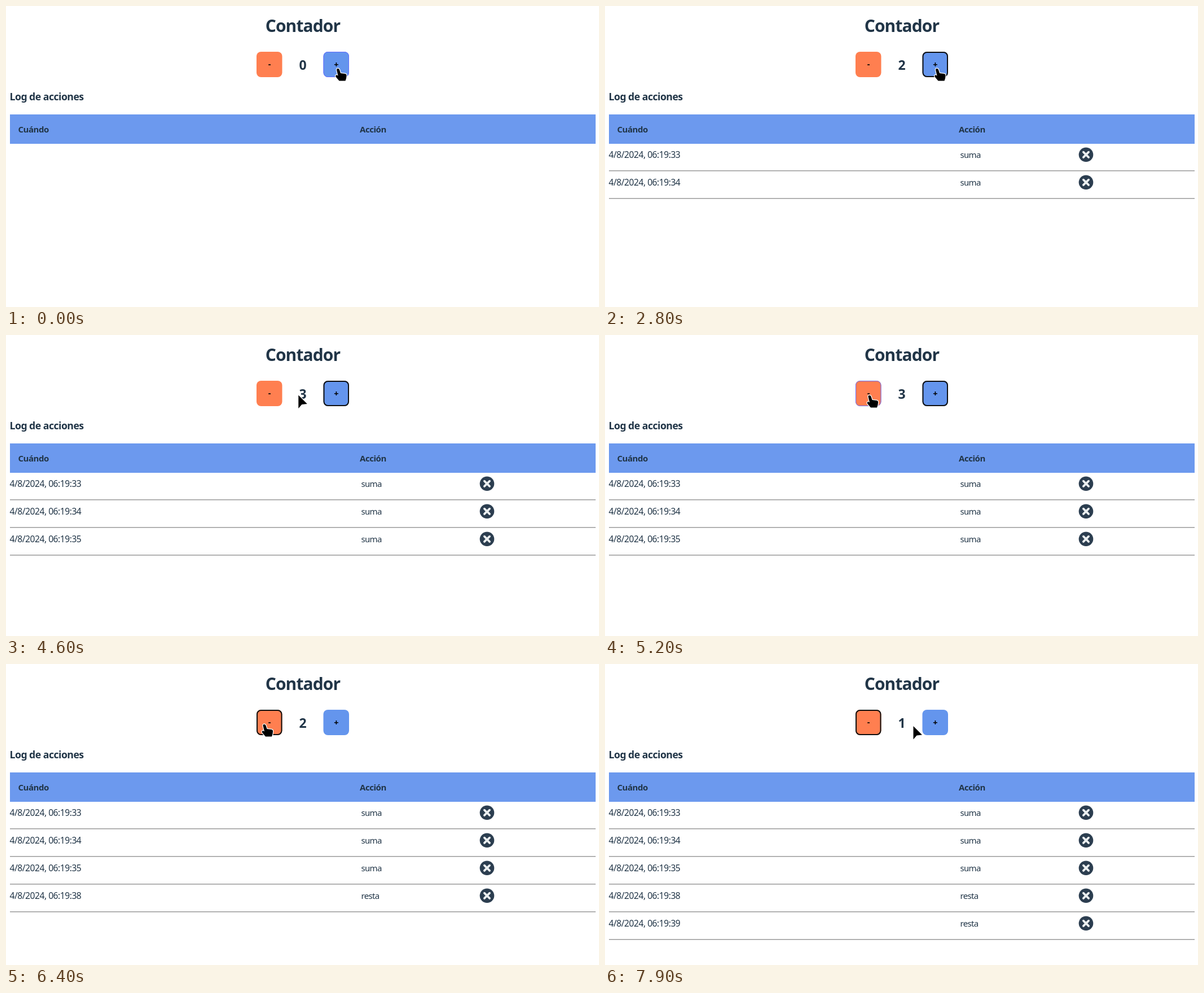
Recreate the animation shown at these times as an HTML page. Size 1051 by 533 pixels, loop 8000 ms.

```html
<!DOCTYPE html>
<html lang="es">
<head>
<meta charset="utf-8">
<title>Contador</title>
<style>
  html, body { margin: 0; width: 100%; height: 100%; overflow: hidden; background: #fff; }
  svg { display: block; }
  text { font: 15.6px "Noto Sans", "Open Sans", sans-serif; fill: #213547; letter-spacing: -.03em; }
  .bold { font-weight: 700; }
  .mid { text-anchor: middle; }
  .title { font-size: 30px; }
  .subtitle { font-size: 17.7px; }
  .head { font-size: 15px; }
  .action { font-size: 15px; letter-spacing: -.045em; }
  .count { font-size: 23px; letter-spacing: 0; }
  .sign { font-size: 14.5px; fill: #000; letter-spacing: 0; }
  .edge { fill: none; }
  .cursor path { stroke: #fff; stroke-width: 2.4; stroke-linejoin: round; paint-order: stroke; }
</style>
</head>
<body>
<svg width="1051" height="533" viewBox="0 0 1051 533">
  <defs>
    <g id="close">
      <circle r="12.8" fill="#2c3e50"/>
      <path d="M-4.6-4.6 4.6 4.6M4.6-4.6-4.6 4.6" stroke="#ecf0f1" stroke-width="3.8" stroke-linecap="round"/>
    </g>
  </defs>
  <text class="bold mid title" x="526" y="45.5">Contador</text>
  <rect x="444" y="81" width="45.5" height="45" rx="8" fill="#ff7f50"/>
  <rect x="562.5" y="81" width="45.5" height="45" rx="8" fill="#6495ed"/>
  <rect class="edge" id="minusEdge"/>
  <rect class="edge" id="plusEdge"/>
  <text class="bold mid sign" x="467" y="108">-</text>
  <text class="bold mid sign" x="585.3" y="109.3">+</text>
  <text class="bold mid count" id="count" x="526" y="113"></text>
  <text class="bold subtitle" x="6.5" y="166.5">Log de acciones</text>
  <rect x="7" y="192" width="1038" height="52" fill="#6c99ee"/>
  <text class="bold head" x="21.5" y="224">Cuándo</text>
  <text class="bold head" x="627" y="224">Acción</text>
  <g id="log"></g>
  <g class="cursor" id="cursor">
    <path id="hand" d="M-3 2C-3-1 1-1 2 2L4 8 12 9Q15 9.5 14.5 13L14 17 12.5 21.5H1.5L-4 15Q-6 12-3 11L-.5 12.5Z"/>
    <path id="arrow" d="M.5 1V24.5L6.5 17.5 16 16.5Z"/>
  </g>
</svg>
<script>
const LOOP = 8000, STEP = 100;
const byId = id => document.getElementById(id);

const actions = [
  { at: 1100, second: 33, name: 'suma' },
  { at: 2800, second: 34, name: 'suma' },
  { at: 4000, second: 35, name: 'suma' },
  { at: 6400, second: 38, name: 'resta' },
  { at: 7500, second: 39, name: 'resta' }
];

// Pointer waypoints: time, x, y
const route = [
  [0, 589, 111], [4200, 589, 111], [4700, 500, 104], [5000, 447, 106],
  [5100, 451, 106], [5200, 469.5, 107], [5500, 561, 103], [5600, 556, 103],
  [6000, 463, 107], [6200, 458.5, 107], [7700, 458.5, 107],
  [7800, 506, 108], [7900, 546, 109], [LOOP, 546, 109]
];

byId('log').innerHTML = actions.map(({ second, name }, i) => `
  <g transform="translate(0 ${i * 49})">
    <text x="6.5" y="269">4/8/2024, 06:19:${second}</text>
    <text class="action" x="629.5" y="269">${name}</text>
    <use href="#close" x="852.5" y="263.3"/>
    <path d="M7 291.5H1045" stroke="#9a9a9a"/>
    <path d="M7 292.5H1045" stroke="#ccc"/>
  </g>`).join('');
const rows = [...byId('log').children];

function pointerAt(t) {
  const i = route.findIndex(([time]) => time > t);
  const [t0, x0, y0] = route[i - 1], [t1, x1, y1] = route[i];
  const k = (t - t0) / (t1 - t0);
  return [x0 + (x1 - x0) * k, y0 + (y1 - y0) * k];
}

function show(el, visible) {
  el.setAttribute('visibility', visible ? 'visible' : 'hidden');
}

function drawEdge(el, left, focused, hovered) {
  const width = focused ? 2 : 1, inset = width / 2;
  const attributes = {
    x: left + inset, y: 81 + inset, width: 45.5 - width, height: 45 - width,
    rx: 8 - inset, 'stroke-width': width, stroke: focused ? '#101010' : '#646cff'
  };
  for (const name in attributes) el.setAttribute(name, attributes[name]);
  show(el, focused || hovered);
}

function render(now) {
  const t = Math.floor(now % LOOP / STEP) * STEP;
  const [x, y] = pointerAt(t);
  const overMinus = x >= 444 && x < 489.5;
  const overPlus = x >= 562.5 && x < 608;
  const overButton = overMinus || overPlus;

  let count = 0;
  actions.forEach(({ at, name }, i) => {
    const done = t >= at;
    if (done) count += name === 'suma' ? 1 : -1;
    show(rows[i], done);
  });
  byId('count').textContent = count;

  drawEdge(byId('minusEdge'), 444, t >= 6300, overMinus);
  drawEdge(byId('plusEdge'), 562.5, t >= 1000 && t < 6300, overPlus);
  byId('cursor').setAttribute('transform', `translate(${x} ${y})`);
  show(byId('hand'), overButton);
  show(byId('arrow'), !overButton);
}

const start = performance.now();
function tick() {
  render(performance.now() - start);
  requestAnimationFrame(tick);
}
tick();
</script>
</body>
</html>
```
